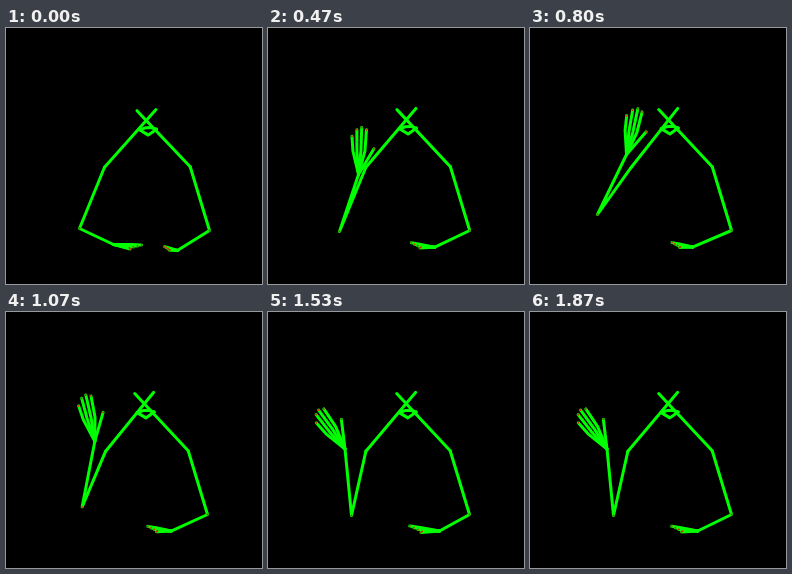
An HTML page with a canvas for the animation above (1940 ms loop, 256 by 256 pixels).

```html
<!DOCTYPE html>
<html lang="en">
<head>
<meta charset="utf-8">
<title>Signing skeleton</title>
<style>
  html, body { margin: 0; width: 100%; height: 100%; overflow: hidden; background: #000; }
  canvas { display: block; width: 256px; height: 256px; }
</style>
</head>
<body>
<canvas id="stage" width="256" height="256"></canvas>
<script>
const ctx = document.getElementById('stage').getContext('2d');
const LOOP = 1940, LAST_STEP = 28;
const GREEN = '#00ff00', RED = '#d02800';

// The signing arm: rest, lift, open hand, lean in, swing out, hold.
// "at" counts steps of 1/15 s, "angle" is the hand's direction in degrees.
const POSES = [
  { at: 0,  ex: 73, ey: 200, wx: 107, wy: 216, angle: 5,    open: 0 },
  { at: 4,  ex: 72, ey: 206, wx: 93,  wy: 181, angle: 10,   open: 0.2 },
  { at: 7,  ex: 71, ey: 203, wx: 90,  wy: 146, angle: -89,  open: 1 },
  { at: 12, ex: 67, ey: 186, wx: 96,  wy: 126, angle: -79,  open: 1 },
  { at: 19, ex: 82, ey: 201, wx: 81,  wy: 132, angle: -123, open: 1 },
  { at: 23, ex: 83, ey: 203, wx: 76.5, wy: 136.5, angle: -127, open: 1 }
];

const lerp = (a, b, t) => a + (b - a) * t;
const mix = (p, q, t) => [lerp(p[0], q[0], t), lerp(p[1], q[1], t)];
const shift = (p, x, y) => [p[0] + x, p[1] + y];

// Slope at a pose that keeps the curve from overshooting
function slope(k, key) {
  const [p, q, r] = [POSES[k - 1], POSES[k], POSES[k + 1]];
  if (!p || !r) return 0;
  const a = (q[key] - p[key]) / (q.at - p.at);
  const b = (r[key] - q[key]) / (r.at - q.at);
  return a * b > 0 ? 2 * a * b / (a + b) : 0;
}

function poseAt(step) {
  let k = 0;
  while (k < POSES.length - 2 && step >= POSES[k + 1].at) k++;
  const p = POSES[k], q = POSES[k + 1], span = q.at - p.at;
  const u = Math.min(1, (step - p.at) / span), v = 1 - u;
  const pose = {};
  for (const key in p) {
    pose[key] = lerp(p[key], q[key], u * u * (3 - 2 * u)) +
      span * u * v * (v * slope(k, key) - u * slope(k + 1, key));
  }
  return pose;
}

function line(...points) {
  ctx.beginPath();
  points.forEach(p => ctx.lineTo(p[0], p[1]));
  ctx.stroke();
}

function dot(p) {
  ctx.beginPath();
  ctx.arc(p[0], p[1], 0.9, 0, Math.PI * 2);
  ctx.fill();
}

function drawHead(head, left, right) {
  line(left, shift(head, 9.5, -11));
  line(right, shift(head, -9.5, -9.8));
  const a = shift(head, -7, 9.3), b = shift(head, 10, 8.7);
  line(a, shift(head, 1.7, 14.6), b);
  line(a, shift(head, -1, 7.3), shift(head, 4.5, 7), b);
}

// Four fingers and a thumb, from a closed bundle to an open fan.
// "side" is 1 or -1 and mirrors the hand. Returns the fingertips.
function drawHand(wrist, angle, open, size, side) {
  const c = Math.cos(angle) * size, s = Math.sin(angle) * size;
  const place = (along, across) =>
    shift(wrist, c * along - s * across * side, s * along + c * across * side);
  const arch = 16 * Math.sin(Math.PI * open);
  const tips = [];
  for (let i = 0; i < 4; i++) {
    const off = i - 1.5;
    const reach = lerp(28 - 4 * i, 47 - 2.2 * (i - 2) ** 2, open);
    const knuckle = place(lerp(Math.min(18, reach), 23.5, open), off * lerp(1, 4, open) - arch);
    const tip = place(reach, off * lerp(1.3, 4.8, open));
    line(wrist, knuckle, tip);
    tips.push(tip);
  }
  const thumb = place(17 + 9 * open, 3 + 12 * open);
  line(wrist, thumb);
  return [...tips, thumb];
}

function draw(step) {
  const pose = poseAt(step);
  const settle = Math.exp(-step / 3);
  const sway = -4.5 * Math.cos((step - 12) * Math.PI / 11);

  const head = [137.7 + 2.3 * settle, 90.8 + 1.2 * settle];
  const elbowL = [pose.ex, pose.ey], wristL = [pose.wx, pose.wy];
  const shoulderL = [98 + (200 - pose.ey) * 0.2, 138.7];
  const shoulderR = [181.7 + 2 * settle, 138.2];
  const elbowR = [201 + 2 * settle, 202];
  const wristR = [166.5 + sway, 218.5 + 3.5 * settle];
  const reachR = [141 + 17 * settle - wristR[0], 215.5 + 3.5 * settle - wristR[1]];

  ctx.fillStyle = '#000';
  ctx.fillRect(0, 0, 256, 256);
  ctx.save();
  ctx.translate(0.5, 0.5); // joints sit on pixel centres
  ctx.strokeStyle = GREEN;
  ctx.lineWidth = 3;
  ctx.lineCap = ctx.lineJoin = 'round';
  drawHead(head, shoulderL, shoulderR);
  line(shoulderL, elbowL, wristL);
  line(shoulderR, elbowR, wristR);
  const tips = [
    ...drawHand(wristL, pose.angle * Math.PI / 180, pose.open, 1, 1),
    ...drawHand(wristR, Math.atan2(reachR[1], reachR[0]), 0, Math.hypot(...reachR) / 28, -1)
  ];
  ctx.fillStyle = RED;
  [...tips, elbowL, elbowR].forEach(dot);
  ctx.restore();
}

function frame(now) {
  const t = now % LOOP;
  // step times fall on multiples of 10 ms
  draw(Math.min(LAST_STEP, Math.floor((Math.floor(t / 10) * 10 + 5) * 3 / 200)));
  requestAnimationFrame(frame);
}

draw(0);
requestAnimationFrame(frame);
</script>
</body>
</html>
```
